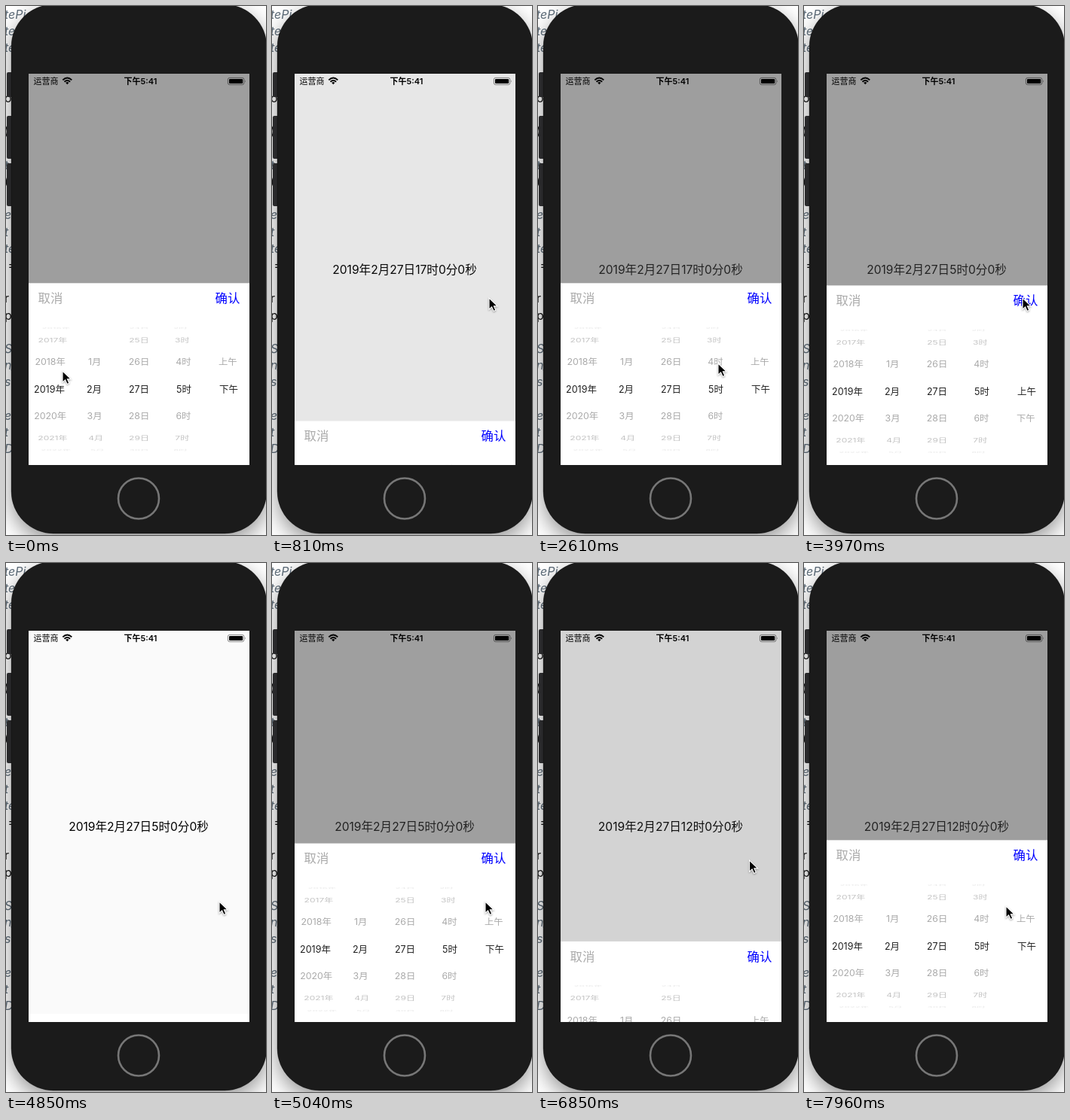
These frames come from a looping animation (345x703 px, 8000 ms). An HTML page:

```html
<!DOCTYPE html>
<html lang="zh-CN">
<head>
<meta charset="utf-8">
<title>日期选择器</title>
<style>
  html, body { margin: 0; width: 100%; height: 100%; overflow: hidden; background: #fff; }
  svg { display: block; width: 345px; height: 703px; }
  text { font-family: Inter, "Noto Sans CJK SC", "Noto Sans CJK", sans-serif; white-space: pre; }
  .code { font: 16px "DejaVu Sans Mono", monospace; fill: #111; }
  .code .comment { font-style: italic; fill: #5d6c79; }
  .middle { text-anchor: middle; }
  #cursor { filter: drop-shadow(0 1px 1px rgba(0, 0, 0, .35)); }
</style>
</head>
<body>
<svg viewBox="0 0 345 703">
  <defs>
    <clipPath id="screenClip"><rect x="30" y="90" width="293" height="520"/></clipPath>
    <filter id="blur" x="-20%" y="-20%" width="140%" height="140%"><feGaussianBlur stdDeviation="14"/></filter>
  </defs>
  <rect width="345" height="703" fill="#fff"/>
  <g id="code" class="code"></g>
  <rect x="7" y="8" width="339" height="703" rx="56" opacity=".42" filter="url(#blur)"/>
  <g fill="#29292b">
    <rect x="1" y="88" width="10" height="33" rx="2"/>
    <rect x="1" y="146" width="10" height="57" rx="2"/>
    <rect x="1" y="209" width="10" height="57" rx="2"/>
  </g>
  <rect x="7" y="-2" width="339" height="703" rx="56" fill="#1b1b1b" stroke="#000" stroke-opacity=".3"/>
  <circle cx="176" cy="654.5" r="27" fill="none" stroke="#777" stroke-width="2.6"/>

  <g clip-path="url(#screenClip)">
    <rect x="30" y="90" width="293" height="520" fill="#fff"/>
    <text id="result" class="middle" x="176" y="355.8" font-size="15.6"></text>
    <rect id="dim" x="30" y="90" width="293" height="520" fill="#444"/>
    <text x="36.5" y="104" font-size="11">运营商</text>
    <g fill="none" stroke="#000" stroke-width="1.9">
      <path d="M75.3 98.4Q81.3 92.8 87.3 98.4M77.5 100.7Q81.3 97.2 85.1 100.7"/>
      <path d="M79.2 101.9Q81.3 100.2 83.4 101.9L81.3 104.2Z" fill="#000" stroke="none"/>
    </g>
    <text class="middle" x="178.5" y="104" font-size="11" font-weight="600">下午5:41</text>
    <rect x="294.4" y="95.4" width="21.4" height="9.2" rx="2.3" fill="none" stroke="#000" stroke-opacity=".5" stroke-width=".9"/>
    <rect x="296" y="97" width="18.2" height="6" rx="1"/>
    <path d="M317 98.4q1.6 1.6 0 3.2z" opacity=".5"/>
    <g id="panel">
      <rect x="30" y="368.3" width="293" height="243" fill="#fff"/>
      <g class="middle" font-size="16.4">
        <text x="59" y="394.2" fill="#aaa">取消</text>
        <text x="294" y="394.2" fill="#00f">确认</text>
      </g>
      <g id="wheels" class="middle" font-size="12.5"></g>
    </g>
  </g>
  <path id="cursor" d="M0 0V15.2L3.6 11.9L6.1 17.5L8.8 16.3L6.4 10.9H11.2Z" stroke="#fff" stroke-width="1.1"/>
</svg>
<script>
const LOOP = 8000, SLIDE = 240, PANEL_HEIGHT = 242;
const CENTER_X = 176.5, CENTER_Y = 509, COLUMN_GAP = 59.5;
const RADIUS = 83.7, ROW_ANGLE = 25.5 * Math.PI / 180, DEPTH = 800;
const $ = id => document.getElementById(id);

function addText(parent, content, attrs = {}) {
  const node = document.createElementNS('http://www.w3.org/2000/svg', 'text');
  node.textContent = content;
  for (const key in attrs) node.setAttribute(key, attrs[key]);
  return parent.appendChild(node);
}

function ease(time, start, duration) {
  const p = Math.min(1, Math.max(0, (time - start) / duration));
  return p * p * (3 - 2 * p);
}

// Editor lines behind the phone; a leading slash marks a comment
'/tePicker,/tePi,/tePi,,,o:,,),,/t,(,,/e,/t,/te, =,,r,po,,/Sh,/n_,/s,,/e,/t,/Da'.split(',')
  .forEach((line, i) => addText($('code'), line.replace('/', ''), {
    x: -2, y: 17 + 22.2 * i, class: line[0] === '/' ? 'comment' : ''
  }));

// Each time the picker is shown: when it opens and closes, the hour it yields, what is dragged
const sessions = [
  { opens: -SLIDE, closes: 648, hour: 17 },
  { opens: 1905, closes: 3955, hour: 5, halfDrag: 2880 },
  { opens: 4820, closes: 6722, hour: 12, hourDrag: 5270 },
  { opens: 7850, closes: LOOP }
];

// Pulls a wheel down past its first row, then lets it spring back to it
function dragToFirst(time, start, from, overshoot) {
  if (!start) return from;
  return from - (from + overshoot) * ease(time, start, 450) + overshoot * ease(time, start + 450, 400);
}

const range = (first, last, unit) =>
  Array.from({ length: last - first + 1 }, (_, i) => first + i + unit);

const wheels = [
  { labels: range(2015, 2023, '年'), at: () => 4 },
  { labels: range(1, 12, '月'), at: () => 1 },
  { labels: range(1, 31, '日'), at: () => 26 },
  { labels: range(0, 11, '时'), at: (time, session) => dragToFirst(time, session.hourDrag, 5, .5) },
  { labels: ['上午', '下午'], at: (time, session) => dragToFirst(time, session.halfDrag, 1, .35) }
];
for (const wheel of wheels) wheel.rows = wheel.labels.map(label => addText($('wheels'), label, { y: 4.6 }));

function drawWheel(wheel, column, position) {
  wheel.rows.forEach((row, i) => {
    const distance = i - position, angle = distance * ROW_ANGLE;
    const visible = Math.abs(distance) < 3.45;
    row.style.display = visible ? '' : 'none';
    if (!visible) return;
    const cos = Math.cos(angle);
    const scale = 1 / (1 + RADIUS * (1 - cos) / DEPTH);
    const x = CENTER_X + (column - 2) * COLUMN_GAP * scale;
    const y = CENTER_Y + RADIUS * Math.sin(angle);
    row.setAttribute('transform', `translate(${x} ${y}) scale(${scale} ${scale * cos})`);
    row.setAttribute('opacity', Math.abs(distance) < .5 ? .87 : .38 * cos);
  });
}

// Cursor stops: arrival time, x, y; longer ways take longer
const stops = [[0, 75, 485], [430, 288, 388], [1140, 238, 363], [1610, 228, 325],
  [2560, 239, 475], [2860, 291, 473], [3170, 300, 543], [3500, 285, 400], [3730, 290, 388],
  [4490, 252, 369], [4850, 283, 450], [5250, 240, 444], [5520, 222, 590],
  [6280, 272, 404], [6550, 280.5, 395], [7660, 280, 480], [7950, 268, 456]];

function cursorAt(time) {
  let [, x, y] = stops[0];
  stops.slice(1).forEach(([arrival, toX, toY], i) => {
    const dx = toX - stops[i][1], dy = toY - stops[i][2];
    const duration = 60 + Math.hypot(dx, dy);
    const p = ease(time, arrival - duration, duration);
    x += dx * p;
    y += dy * p;
  });
  return [x, y];
}

function draw(time) {
  const session = sessions.findLast(({ opens }) => time >= opens);
  const openTime = Math.min(SLIDE, LOOP - 40 - session.opens);
  const open = ease(time, session.opens, openTime) - ease(time, session.closes, SLIDE);
  $('panel').setAttribute('transform', `translate(0 ${(1 - open) * PANEL_HEIGHT})`);
  $('dim').setAttribute('opacity', open * .519);
  const confirmed = sessions.findLast(({ closes }) => time >= closes);
  $('result').textContent = confirmed ? `2019年2月27日${confirmed.hour}时0分0秒` : '';
  wheels.forEach((wheel, column) => drawWheel(wheel, column, wheel.at(time, session)));
  $('cursor').setAttribute('transform', `translate(${cursorAt(time).join(' ')})`);
}

const start = performance.now();
function tick() {
  draw((performance.now() - start) % LOOP);
  requestAnimationFrame(tick);
}
tick();
</script>
</body>
</html>
```
